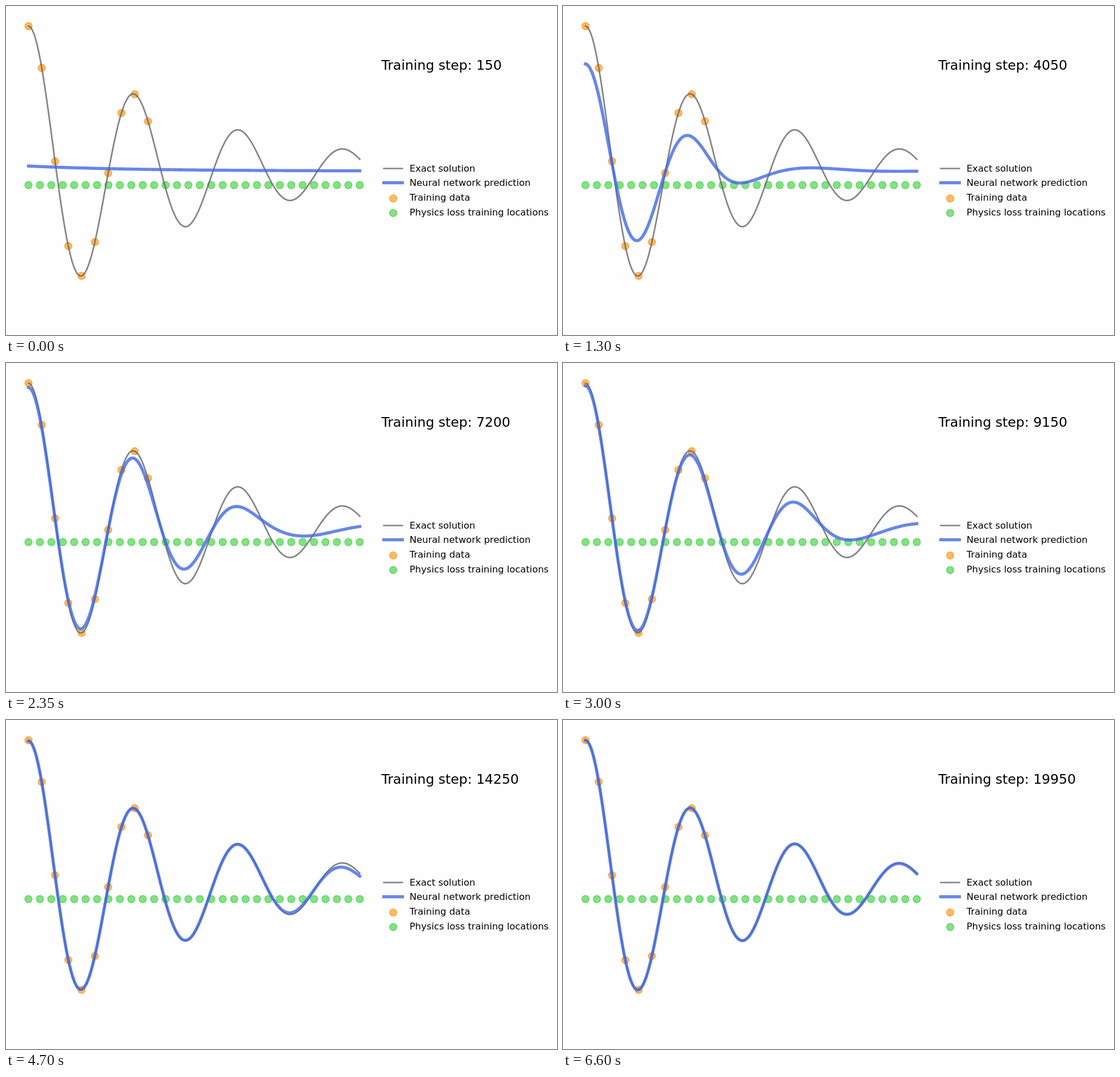
These frames come from a looping animation (968 by 578 pixels, 6650 ms). An HTML page:

```html
<!DOCTYPE html>
<html lang="en">
<head>
<meta charset="utf-8">
<title>Training a damped oscillator</title>
<style>
  html, body { margin: 0; width: 100%; height: 100%; overflow: hidden; background: #fefefe; }
  svg { display: block; }
  text { font-family: "DejaVu Sans", Verdana, sans-serif; font-size: 16.35px; fill: #000; }
  #step { font-size: 23.54px; }
  .exact, .net { fill: none; stroke-opacity: .8; stroke-linecap: square; stroke-linejoin: round; }
  .exact { stroke: #666; stroke-width: 2.72; }
  .net { stroke: #4169e1; stroke-width: 5.45; }
  .dot { fill-opacity: .6; stroke-opacity: .6; stroke-width: 1.7; }
  .data { fill: #ff8c00; stroke: #ff8c00; }
  .loss { fill: #32cd32; stroke: #32cd32; }
</style>
</head>
<body>
<svg width="968" height="578" viewBox="0 0 968 578">
  <g id="dots"></g>
  <path id="exact" class="exact"/>
  <path id="net" class="net"/>
  <text id="step" x="659.5" y="111.5"></text>
  <path class="exact" d="M663.7 285.5H696.3"/>
  <path class="net" d="M663.7 310.5H696.3"/>
  <text x="709" y="290.6">Exact solution</text>
  <text x="709" y="316.2">Neural network prediction</text>
  <text x="709" y="342.1">Training data</text>
  <text x="709" y="368.1">Physics loss training locations</text>
</svg>
<script>
const LOOP = 6650, TICK = 50, STEPS_PER_TICK = 150;
const LEFT = 39.5, WIDTH = 582, ZERO = 289.3, UNIT = 253.8;
const DAMPING = 2, OMEGA = Math.sqrt(400 - DAMPING ** 2);
const SAMPLES = 250;

const byId = id => document.getElementById(id);
const px = x => LEFT + WIDTH * x;
const mix = (a, b, u) => a + (b - a) * u;
const clamp = u => Math.min(1, Math.max(0, u));
const smooth = u => u * u * (3 - 2 * u);
const decay = (t, span) => Math.exp(-t / span);

// Zero up to the given edge, then a straight ramp, with a rounded corner.
const ramp = (x, edge, round) => round * Math.log(1 + Math.exp((x - edge) / round));

// Damped wave in pixels below the zero line; the phase may lag behind.
const wave = (x, lag = 0) => {
  const phase = OMEGA * x - lag;
  return -UNIT * Math.exp(-DAMPING * x) *
    (Math.cos(phase) + DAMPING / OMEGA * Math.sin(phase));
};

// The untrained network gives a nearly flat curve that starts to bend.
const flat = x => .7 - 8.8 * decay(x, .33);
const bent = x => -.5 - 4.5 * Math.cos(8.06 * (x - .63)) - 18.7 * decay(x, .085);

// How far right the phase and the amplitude have been learned: ms, phase, amplitude.
const reach = [
  [1400, .48, .25],
  [1800, .58, .34],
  [2350, .68, .385],
  [3650, .84, .49],
  [4700, 1.15, .88],
  [6600, 1.4, 1.1]
];

function reachAt(t) {
  const i = Math.max(1, reach.findIndex(([ms]) => t <= ms));
  const [t0, ...from] = reach[i - 1], [t1, ...to] = reach[i];
  return from.map((v, k) => mix(v, to[k], clamp((t - t0) / (t1 - t0))));
}

function prediction(t) {
  const bend = clamp(t / 900) ** 2.5;
  const learned = smooth(clamp((t - 900) / 500));
  const [phaseEdge, ampEdge] = reachAt(t);
  const since = Math.max(t, 1400) - 1800;
  const shortfall = .04 * decay(since, 1500) + .02 * decay(since, 210);
  const fade = 2.2 + 1.1 * decay(since, 400);
  return x => {
    const early = mix(flat(x), bent(x), bend);
    const loss = shortfall + fade * ramp(x, ampEdge, .08);
    return mix(early, Math.exp(-loss) * wave(x, 7 * ramp(x, phaseEdge, .04)), learned);
  };
}

function curve(f) {
  let d = "";
  for (let i = 0; i <= SAMPLES; i++) {
    const x = i / SAMPLES;
    d += (i ? "L" : "M") + px(x).toFixed(2) + " " + (ZERO + f(x)).toFixed(2);
  }
  return d;
}

function dot(kind, x, y) {
  const c = document.createElementNS("http://www.w3.org/2000/svg", "circle");
  c.setAttribute("class", "dot " + kind);
  c.setAttribute("cx", x);
  c.setAttribute("cy", y);
  c.setAttribute("r", 6.3);
  byId("dots").append(c);
}

function render(ms) {
  const tick = Math.floor((ms % LOOP) / TICK);
  byId("net").setAttribute("d", curve(prediction(tick * TICK)));
  byId("step").textContent = "Training step: " + (tick + 1) * STEPS_PER_TICK;
}

for (let i = 0; i < 10; i++) {
  const x = 20 * i / 499;
  dot("data", px(x), ZERO + wave(x));
}
for (let i = 0; i < 30; i++) dot("loss", px(i / 29), ZERO + UNIT / 10);
dot("data", 680.2, 338.2);
dot("loss", 680.2, 363.8);
byId("exact").setAttribute("d", curve(x => wave(x)));

let start;
function loop(now) {
  start ??= now;
  render(now - start);
  requestAnimationFrame(loop);
}
render(0);
requestAnimationFrame(loop);
</script>
</body>
</html>
```
